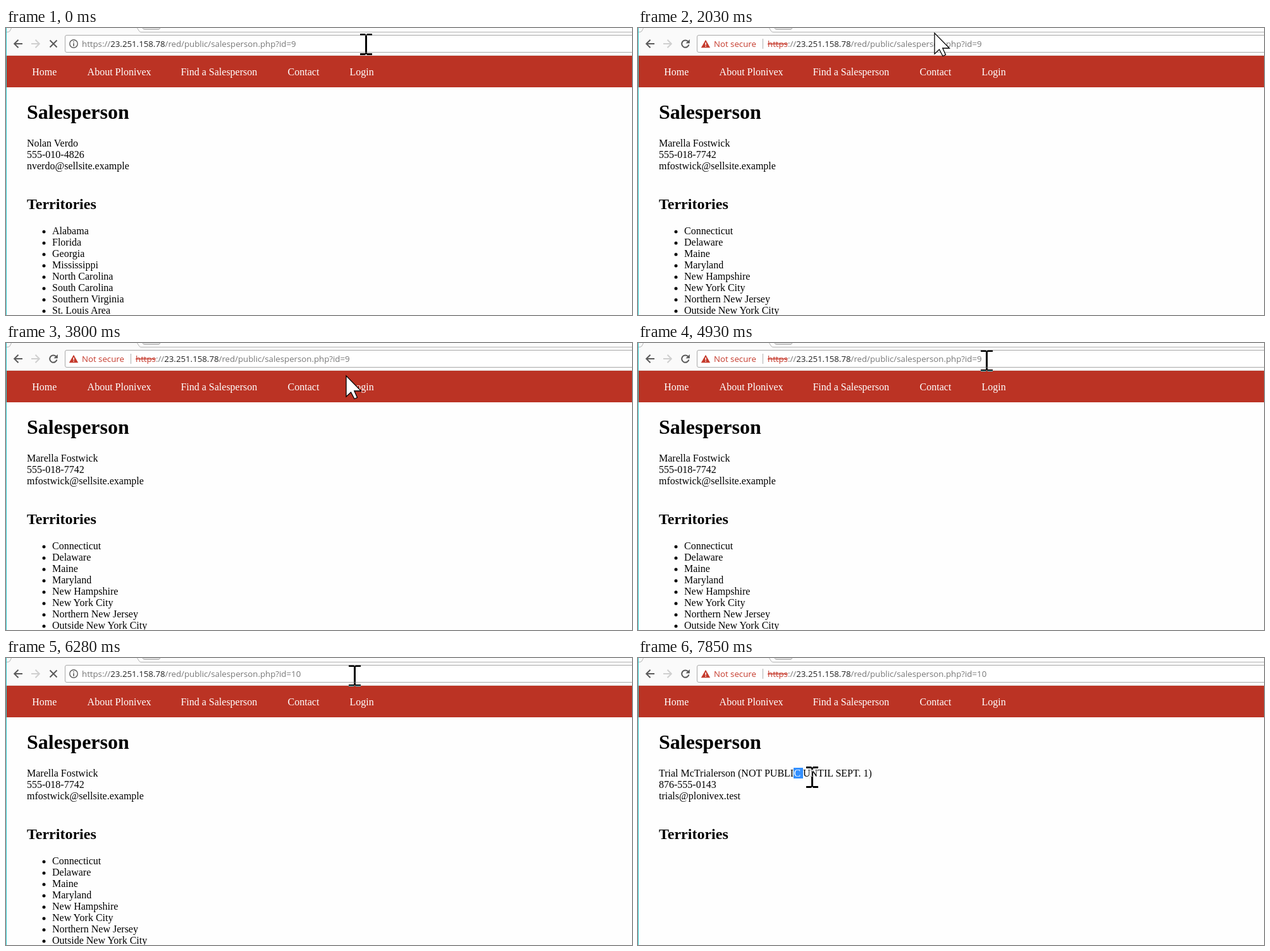
Animation, 990 px wide and 455 px high, one loop 7990 ms. Source, as an HTML page:

```html
<!DOCTYPE html>
<html lang="en">
<head>
<meta charset="utf-8">
<title>Salesperson</title>
<style>
html, body { margin: 0; width: 100%; height: 100%; overflow: hidden; background: #fefefe; }
svg { display: block; width: 990px; height: 455px; isolation: isolate; }
text { white-space: pre; font: 16px "Liberation Serif", "Times New Roman", serif; fill: #000; }
.ui { font: 13.25px "Open Sans", "Noto Sans", sans-serif; fill: #777; }
.h1 { font-size: 32px; font-weight: 700; }
.h2 { font-size: 24px; font-weight: 700; }
.nav { fill: #fff; }
.dark { fill: #222; }
.red { fill: #c5392b; }
.strike { text-decoration: line-through; }
.pick { font-size: 13.56px; font-weight: 700; fill: #fff; }
.beam { mix-blend-mode: difference; fill: #fff; }
</style>
</head>
<body>
<svg viewBox="0 0 990 455">
  <rect width="990" height="455" fill="#fefefe"/>
  <g id="page"></g>
  <g id="nav"></g>
  <g id="chrome"></g>
  <g id="reload"></g>
  <g id="bar"></g>
  <g id="popup"></g>
  <rect id="caret" y="14" width="1" height="19" fill="#666"/>
  <rect width="1" height="455" fill="#35cbd0"/>
  <g id="cursor"></g>
</svg>
<script>
const LOOP = 7990;
const $ = id => document.getElementById(id);
const text = (x, y, str, cls = '') => `<text x="${x}" y="${y}" class="${cls}">${str}</text>`;
const span = (str, cls) => `<tspan class="${cls}">${str}</tspan>`;
const rect = (x, y, w, h, fill) => `<rect x="${x}" y="${y}" width="${w}" height="${h}" fill="${fill}"/>`;
const line = (d, color, w = 1) => `<path d="${d}" fill="none" stroke="${color}" stroke-width="${w}"/>`;

const HOST = '23.251.158.78';
const PATH = '/red/public/salesperson.php?id=';

const people = [
  { lines: ['Nolan Verdo', '555-010-4826', 'nverdo@sellsite.example'],
    areas: ['Alabama', 'Florida', 'Georgia', 'Mississippi', 'North Carolina', 'South Carolina',
      'Southern Virginia', 'St. Louis Area'] },
  { lines: ['Marella Fostwick', '555-018-7742', 'mfostwick@sellsite.example'],
    areas: ['Connecticut', 'Delaware', 'Maine', 'Maryland', 'New Hampshire', 'New York City',
      'Northern New Jersey', 'Outside New York City'] },
  { lines: ['Trial McTrialerson', '876-555-0143', 'trials@plonivex.test'],
    areas: [], note: true }
];

const cursors = {
  arrow: '<path d="M1 1V34L8.5 27L14 37.5L18.5 35.5L13.8 25H24.5Z" fill="#fff" stroke="#000" stroke-width="1.3"/>',
  beam: '<path class="beam" d="M-9.5 0h8l1.5 2l1.5-2h8v3h-8v28h8v3h-8l-1.5-2l-1.5 2h-8v-3h8v-28h-8z"/>'
};

const icons = {
  info: '<circle cx="107" cy="25" r="6.2" fill="none" stroke="#5a5a5a" stroke-width="1.4"/>' +
    rect(106.2, 24, 1.6, 4.8, '#5a5a5a') + rect(106.2, 21.2, 1.6, 1.6, '#5a5a5a'),
  warn: '<path d="M107 18.8L114.2 31.2H99.8Z" fill="#c5392b"/>' +
    rect(106.3, 23, 1.5, 4, '#fff') + rect(106.3, 28, 1.5, 1.5, '#fff'),
  page: sheet(25, '#5a5a5a')
};

function sheet(y, color) {
  return line(`M103.5 ${y - 5.5}h4.5l3 3v8h-7.5zM107.5 ${y - 5.5}v3.5h3.5`, color, 1.2);
}

function drawPage({ page, sel }) {
  const { lines, areas, note } = people[page];
  let out = text(33, 144, 'Salesperson', 'h1') + text(33, 287, 'Territories', 'h2');
  out += lines.map((s, i) => text(33, 188 + 18 * i, s)).join('');
  if (sel) out += rect(246, 174, 15, 17, '#3390ff');
  if (note) out += text(158, 188, '(NOT PUBLI') +
    text(246.4, 188, 'C', sel ? 'nav' : '') + text(261, 188, 'UNTIL SEPT. 1)');
  return out + areas.map((s, i) =>
    `<circle cx="60" cy="${323 + 18 * i}" r="2.5"/>` + text(73, 327 + 18 * i, s)).join('');
}

function drawBar({ icon, id }) {
  const tail = span('://', '') + span(HOST, 'dark') + PATH + id;
  if (icon !== 'warn') return icons[icon] + text(120, 30, 'https' + tail, 'ui');
  return icons.warn + text(120, 30, 'Not secure', 'ui red') + rect(197, 17, 1, 16, '#b0b0b0') +
    text(205, 30, span('https', 'red strike') + tail, 'ui');
}

function drawReload({ loading }) {
  return loading
    ? line('M69.5 19.5L80.5 30.5M80.5 19.5L69.5 30.5', '#5a5a5a', 2)
    : line('M79 21.2A5.7 5.7 0 1 0 80.4 26.5', '#5a5a5a', 2) + '<path d="M81.8 18v6.3h-6.3z" fill="#5a5a5a"/>';
}

function drawPopup({ rows, id }) {
  if (!rows) return '';
  const url = 'https://' + HOST + PATH;
  const end = 52 + 25 * rows;
  let out = rect(1, 42, 989, end - 42, '#fff') + rect(1, 42, 989, 1, '#d4d4d4') +
    rect(1, end, 989, 1, '#e2e2e2') + rect(1, end + 1, 989, 1, '#f2f2f2') +
    rect(93, 47, 897, 25, '#0078d7') + sheet(59.5, '#fff') +
    text(120, 64, url + id, 'ui pick') +
    '<circle cx="105.5" cy="82.5" r="3.7" fill="none" stroke="#666" stroke-width="1.5"/>' +
    line('M108.3 85.3L112.5 89.5', '#666', 1.8) +
    text(120, 89, span(url + id, 'dark') + ' - Quarno Search', 'ui');
  for (let i = 2; i < rows; i++) {
    const y = 59.5 + 25 * i;
    out += sheet(y, '#666') + text(120, y + 4.5, span(url + (11 - i), 'dark') + ' - Salesperson', 'ui');
  }
  return out;
}

$('nav').innerHTML = rect(1, 44, 989, 50, '#bb3324') +
  [[41.3, 'Home'], [128.6, 'About Plonivex'], [276.4, 'Find a Salesperson'], [445.6, 'Contact'], [543.6, 'Login']]
    .map(([x, s]) => text(x, 75, s, 'nav')).join('');

$('chrome').innerHTML = rect(0, 0, 990, 43, '#fafafa') +
  '<path d="M208 0L212 6.5H990V0Z" fill="#fdfdfd"/>' +
  line('M207.5 0L211 5.5Q212 6.5 214 6.5H990', '#b4b4b4') +
  line('M8.5 0L6 5Q5 6.5 1 6.5', '#b4b4b4') +
  '<path d="M214.5 -2L216.5 1Q217.5 2.5 220 2.5H241Q244 2.5 243.5 -2Z" fill="#dcdcdc" stroke="#b0b0b0"/>' +
  rect(0, 43, 990, 1, '#e3dedd') +
  '<rect x="93.5" y="11.5" width="910" height="27" rx="2.5" fill="#fff" stroke="#a9a9a9"/>' +
  line('M26 25H13.5M19.5 18.7L13.2 25L19.5 31.3', '#5a5a5a', 2) +
  line('M40 25H52.5M46.5 18.7L52.8 25L46.5 31.3', '#cfcfcf', 2);

// time, cursor, x, y, changes that stay
const steps = [
  [0, 'beam', 569.5, 9, { page: 0, icon: 'info', id: '9', loading: true, rows: 0, caret: 0, sel: false }],
  [270, 'beam', 569.5, 9, { icon: 'warn' }],
  [400, 'beam', 569.5, 9, { page: 1 }],
  [520, 'beam', 569.5, 9, { loading: false }],
  [1480, 'beam', 564.5, 9],
  [1750, 'beam', 556.5, 9],
  [1890, 'beam', 539.5, 9],
  [2030, 'arrow', 468, 7],
  [2150, 'arrow', 452, 2],
  [2280, 'arrow', 441, -2],
  [2420, 'arrow', 430, -6],
  [2540, 'arrow', 424, -9],
  [2950, 'arrow', 391, 40],
  [3080, 'arrow', 296, 132],
  [3240, 'arrow', 147, 169],
  [3380, 'arrow', 140, 171],
  [3500, 'arrow', 227, 170],
  [3650, 'arrow', 469, 80],
  [3800, 'arrow', 537, 51],
  [3920, 'beam', 565.5, 15],
  [4050, 'beam', 570.5, 12],
  [4170, 'beam', 565.5, 11],
  [4300, 'beam', 556.5, 11],
  [4420, 'beam', 551.5, 11, { caret: 545 }],
  [4930, 'beam', 551.5, 11, { caret: 0 }],
  [5360, 'beam', 551.5, 11, { icon: 'page', id: '', rows: 4, caret: 452 }],
  [5630, 'beam', 551.5, 11, { id: '1', rows: 2, caret: 460 }],
  [5750, 'beam', 551.5, 11, { id: '10', caret: 467 }],
  [6280, 'beam', 551.5, 11, { icon: 'info', rows: 0, caret: 0, loading: true }],
  [6580, 'beam', 551.5, 11, { icon: 'warn', page: 2 }],
  [6710, 'beam', 551.5, 11, { loading: false }],
  [6860, 'beam', 546.5, 13],
  [7010, 'arrow', 430, 102],
  [7160, 'beam', 280.5, 173],
  [7310, 'beam', 258.5, 204],
  [7460, 'beam', 264.5, 189],
  [7580, 'beam', 196.5, 174],
  [7720, 'beam', 194.5, 174],
  [7850, 'beam', 275.5, 172, { sel: true }]
];

let last = {};
const states = steps.map(([time, kind, x, y, change]) => {
  last = { ...last, ...change, time, kind, x, y };
  return last;
});

function show(state) {
  $('page').innerHTML = drawPage(state);
  $('reload').innerHTML = drawReload(state);
  $('bar').innerHTML = drawBar(state);
  $('popup').innerHTML = drawPopup(state);
  $('caret').setAttribute('x', state.caret || -9);
  $('cursor').innerHTML = cursors[state.kind];
  // Offset the shape itself so blending still sees the whole stage.
  $('cursor').firstChild.setAttribute('transform', `translate(${state.x} ${state.y})`);
}

let current = null;
const start = performance.now();
function tick() {
  const t = Math.max(0, performance.now() - start) % LOOP;
  const state = states.findLast(s => s.time <= t);
  if (state !== current) show(current = state);
  requestAnimationFrame(tick);
}
tick();
</script>
</body>
</html>
```
